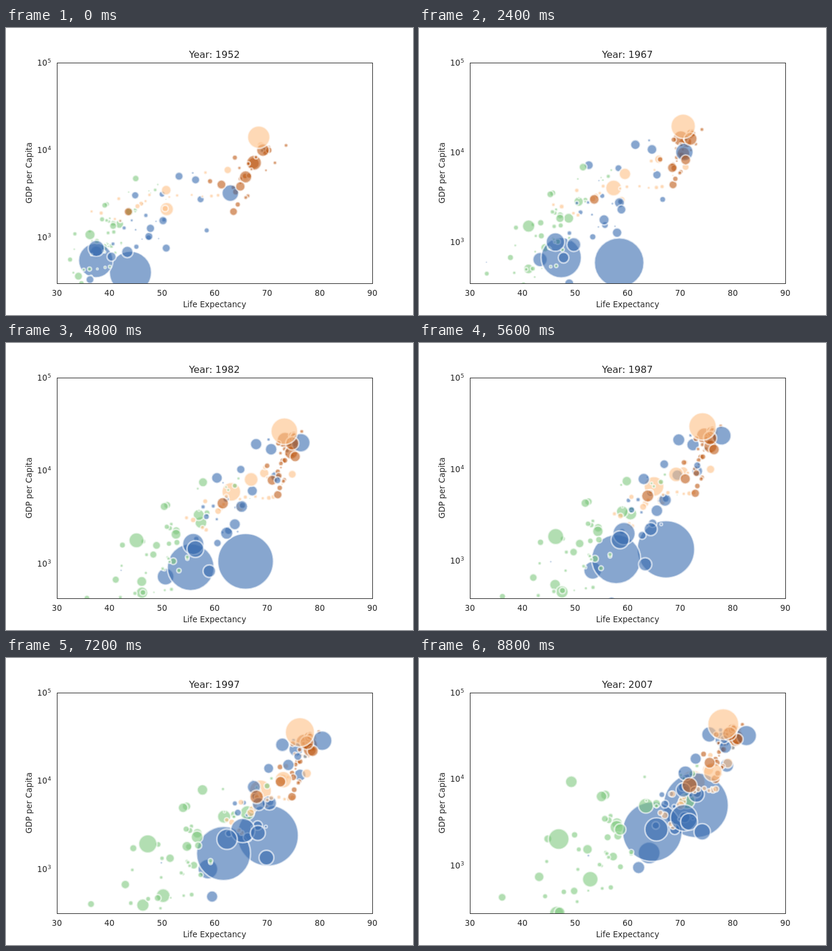
Animation of 680x480 px, one loop 9600 ms. Source, as an HTML page:

```html
<!DOCTYPE html>
<html lang="en">
<head>
<meta charset="utf-8">
<title>Life Expectancy and GDP</title>
<style>
html, body { margin: 0; width: 100%; height: 100%; overflow: hidden; background: #fff; }
svg { display: block; }
text { font: 13.333px "DejaVu Sans", sans-serif; fill: #262626; text-anchor: middle; }
#title { font-size: 16px; }
.tick text { text-anchor: start; }
.tick .power { font-size: 9.333px; }
circle { fill-opacity: .6; stroke: #fff; stroke-opacity: .6; stroke-width: 2.667; }
</style>
</head>
<body>
<svg width="680" height="480" viewBox="0 0 680 480">
  <clipPath id="plot"><rect x="85" y="57.6" width="527" height="369.6"/></clipPath>
  <g id="dots" clip-path="url(#plot)"></g>
  <rect x="85.5" y="58.5" width="527" height="369" fill="none" stroke="#262626"/>
  <text id="title" x="348.2" y="50"></text>
  <g id="axes"></g>
  <text x="348.5" y="467">Life Expectancy</text>
  <text transform="translate(43 242.4) rotate(-90)">GDP per Capita</text>
</svg>
<script>
const LEFT = 85, RIGHT = 612, TOP = 57.6, BOTTOM = 427.2;
const FIRST_YEAR = 1952, STEP_YEARS = 5, STEPS = 12, STEP_MS = 800;
const AF = '#7fc97f', AM = '#fdc086', AS = '#386cb0', EU = '#bf5b17', OC = '#666666';

// The lowest value on the GDP axis at each step
const floors = [299, 336, 355, 349, 357, 371, 424, 385, 347, 312, 241, 278];

// Steps at which the key points of a path lie, by their number
const keySteps = {
  2: [0, 11],
  3: [0, 4, 11],
  4: [0, 4, 8, 11],
  7: [0, 1, 2, 3, 4, 8, 11]
};

const byId = id => document.getElementById(id);
const bubbles = [];

function make(tag, parent, attrs, text = '') {
  const el = document.createElementNS('http://www.w3.org/2000/svg', tag);
  for (const key in attrs) el.setAttribute(key, attrs[key]);
  el.textContent = text;
  return parent.appendChild(el);
}

function along(points, step) {
  const keys = keySteps[points.length];
  let i = 0;
  while (i < keys.length - 2 && step > keys[i + 1]) i++;
  const t = (step - keys[i]) / (keys[i + 1] - keys[i]);
  return points[i] + (points[i + 1] - points[i]) * t;
}

// Population in millions, life expectancy, GDP per capita; later bubbles lie on top
function dot(color, people, life, gdp) {
  bubbles.push({
    el: make('circle', byId('dots'), { fill: color }),
    people: people.map(Math.log10), life, gdp: gdp.map(Math.log10)
  });
}

let seed = 11;
function random() {
  seed = (seed * 16807) % 2147483647;
  return seed / 2147483647;
}

// Random offset around 0 with unit deviation
const offset = () => (random() + random() - 1) * 2.45;

// Small countries around the path of their continent; the richer ones live longer.
// Means and spreads lie at the key steps; GDP and population are powers of ten.
function crowd(color, count, people, life, gdp) {
  while (count--) {
    const rich = offset();
    const healthy = .75 * rich + .65 * offset();
    const size = 10 ** (people.mean + people.spread * offset());
    dot(color, [size, size * people.growth],
      life.mean.map((m, i) => m + healthy * life.spread[i]),
      gdp.mean.map((m, i) => 10 ** (m + rich * gdp.spread[i])));
  }
}

dot(AM, [17.9, 40.3], [62.5, 67.1, 75.3], [5911, 9443, 9308, 12779]);
dot(AS, [46.9, 150], [37.5, 45.3, 64.1], [684, 630, 838, 1391]);
dot(AM, [56.6, 190], [50.9, 59.5, 72.4], [2109, 4986, 9066]);
dot(AM, [14.8, 33.4], [68.8, 80.7], [11367, 18971, 36319]);
dot(AS, [556, 862, 1319], [44, 50.5, 44.5, 58.4, 63.1, 68.7, 73], [400, 677, 1656, 4959]);
dot(AM, [12.4, 44.2], [50.6, 61.6, 72.9], [2144, 3265, 7007]);
dot(AF, [14.1, 64.6], [39.1, 46, 46.5], [781, 905, 458, 278]);
dot(AF, [22.2, 80.3], [41.9, 51.1, 63.7, 71.3], [1419, 2024, 3795, 5581]);
dot(AF, [20.9, 76.5], [34.1, 43.5, 52.9], [362, 566, 421, 691]);
dot(EU, [42.5, 61.1], [67.4, 80.7], [7030, 16107, 30470]);
dot(EU, [69.1, 82.4], [67.5, 71, 79.4], [7144, 18016, 32170]);
dot(AS, [372, 567, 1110], [37.4, 50.7, 60.2, 64.7], [547, 724, 1164, 2452]);

crowd(AF, 46, { mean: .45, spread: .45, growth: 3.5 },
  { mean: [38.8, 47, 53, 54.5], spread: [5, 6, 8, 9] },
  { mean: [2.97, 3.12, 3.1, 3.2], spread: [.28, .33, .38, .42] });
crowd(AS, 20, { mean: .6, spread: .42, growth: 3.6 },
  { mean: [47, 58, 66.5, 70.5], spread: [8, 8, 6.5, 6.5] },
  { mean: [3.25, 3.6, 3.78, 3.9], spread: [.33, .45, .42, .45] });
crowd(AM, 19, { mean: .48, spread: .3, growth: 2.6 },
  { mean: [52, 61.5, 69, 73], spread: [8, 6.5, 4.5, 3.5] },
  { mean: [3.46, 3.64, 3.74, 3.85], spread: [.16, .18, .21, .24] });
crowd(EU, 23, { mean: .77, spread: .28, growth: 1.25 },
  { mean: [65.3, 71, 74.6, 77.6], spread: [4.5, 1.8, 2.3, 2.3] },
  { mean: [3.73, 4.08, 4.18, 4.36], spread: [.24, .18, .25, .2] });
crowd(OC, 2, { mean: .7, spread: .2, growth: 2.2 },
  { mean: [69.3, 71.9, 77, 80.7], spread: [.2, .1, .8, .5] },
  { mean: [4.01, 4.21, 4.32, 4.47], spread: [.01, .01, .05, .06] });

dot(AS, [82, 224], [37.5, 49.2, 62.7, 70.7], [750, 1111, 2383, 3541]);
dot(AS, [17.3, 69.5], [44.9, 55.2, 65.7, 71], [3035, 9614, 7236, 11606]);
dot(EU, [47.7, 58.1], [65.9, 72.2, 80.5], [4931, 12269, 28570]);
dot(AS, [86.5, 128], [63, 73.4, 79.4, 82.6], [3217, 14779, 26825, 31656]);
dot(AS, [20.9, 49], [47.5, 62.6, 78.6], [1031, 3031, 12104, 23348]);
dot(AM, [30.1, 109], [50.8, 62.4, 71.5, 76.2], [3478, 6809, 9472, 11978]);
dot(AS, [20.1, 47.8], [36.3, 53.1, 62.1], [331, 357, 347, 944]);
dot(AF, [33.1, 135], [36.3, 42.8, 47.5, 46.9], [1077, 1698, 2014]);
dot(AS, [41.3, 169], [43.4, 51.9, 60.8, 65.5], [685, 1050, 1972, 2606]);
dot(AS, [22.4, 91.1], [47.8, 58.1, 66.5, 71.7], [1273, 1989, 2279, 3190]);
dot(EU, [25.7, 38.5], [61.3, 70.9, 71, 75.6], [4029, 8007, 7739, 15390]);
dot(AF, [14.3, 44], [45, 53.7, 61.9, 49.3], [4725, 7766, 7226, 9270]);
dot(EU, [28.5, 40.4], [64.9, 73.1, 80.9], [3835, 10639, 28821]);
dot(AF, [8.5, 42.3], [38.6, 45.1, 58.6], [1616, 1660, 1492, 2602]);
dot(AS, [8.6, 23.2], [58.5, 69.4, 78.4], [1207, 4062, 15216, 28718]);
dot(AS, [21.3, 65.1], [50.8, 60.4, 67.3, 70.6], [758, 1524, 4617, 7458]);
dot(EU, [22.2, 71.2], [43.6, 57, 66.1, 71.8], [1969, 3451, 8458]);
dot(EU, [50.4, 60.8], [69.2, 79.4], [9980, 15895, 33203]);
dot(AM, [158, 301], [68.4, 71.3, 78.2], [13990, 21806, 42952]);
dot(AS, [26.2, 85.3], [40.4, 50.3, 67.7, 74.2], [605, 700, 989, 2442]);

const xOf = life => LEFT + (life - 30) / 60 * (RIGHT - LEFT);

for (let life = 30; life <= 90; life += 10)
  make('text', byId('axes'), { x: xOf(life), y: 448 }, life);

const ticks = [5, 4, 3].map(power => {
  const el = make('g', byId('axes'), { class: 'tick' });
  make('text', el, { x: 52, y: 5 }, '10');
  make('text', el, { x: 69.5, y: 0, class: 'power' }, power);
  return { el, power };
});

function draw(step) {
  const decade = (BOTTOM - TOP) / (5 - Math.log10(floors[step]));
  const yOf = power => TOP + (5 - power) * decade;
  byId('title').textContent = 'Year: ' + (FIRST_YEAR + step * STEP_YEARS);
  for (const { el, power } of ticks)
    el.setAttribute('transform', `translate(0 ${Math.round(yOf(power))})`);
  for (const { el, people, life, gdp } of bubbles) {
    el.setAttribute('cx', xOf(along(life, step)).toFixed(2));
    el.setAttribute('cy', yOf(along(gdp, step)).toFixed(2));
    el.setAttribute('r', (Math.sqrt(5 * 10 ** along(people, step)) * 2 / 3).toFixed(2));
  }
}

let shown = -1;
const start = performance.now();

function tick(now) {
  const step = Math.floor(Math.max(0, now - start) / STEP_MS) % STEPS;
  if (step !== shown) draw(shown = step);
  requestAnimationFrame(tick);
}

tick(start);
</script>
</body>
</html>
```
